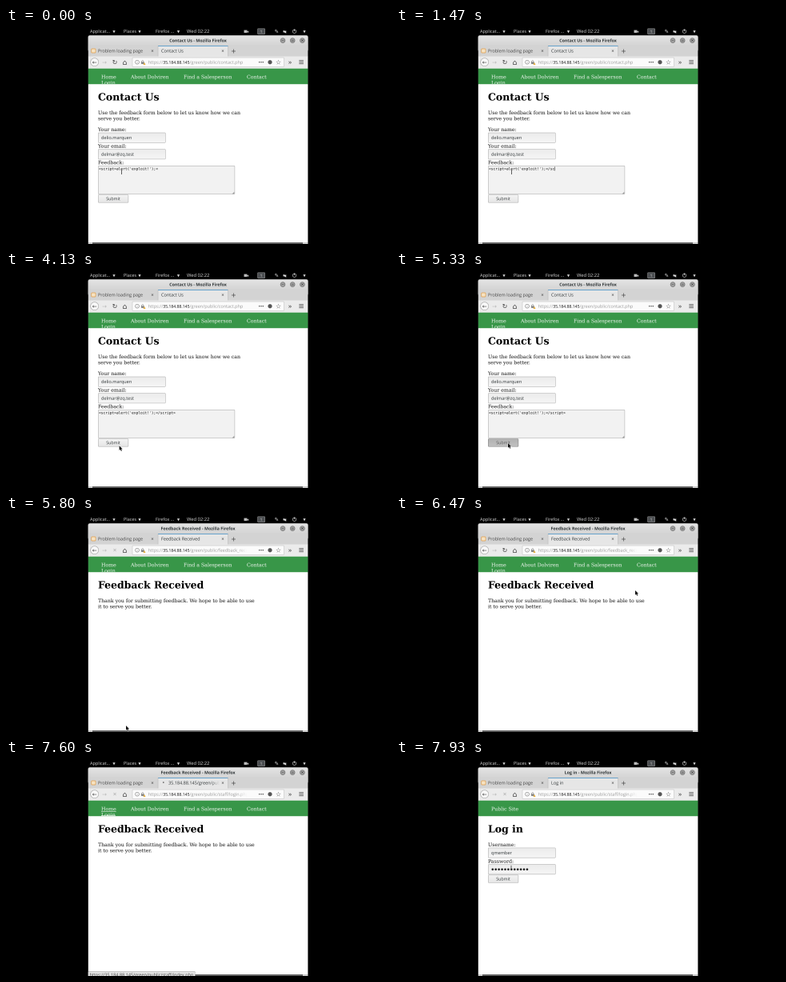
Recreate the animation shown at these times as an HTML page with a canvas. Size 480 by 270 pixels, loop 8 s.

```html
<!DOCTYPE html>
<html lang="en">
<head>
<meta charset="utf-8">
<title>Contact form</title>
<style>
html, body { margin: 0; width: 100%; height: 100%; overflow: hidden; background: #000; }
canvas { display: block; width: 480px; height: 270px; }
</style>
</head>
<body>
<canvas id="stage" width="480" height="270"></canvas>
<script>
const LOOP = 8000, W = 480, H = 270, ZOOM = 4;
const view = document.getElementById('stage').getContext('2d');

// Drawn large, then averaged down for soft small text
const sheet = document.createElement('canvas');
sheet.width = W * ZOOM;
sheet.height = H * ZOOM;
const ctx = sheet.getContext('2d');

const SERIF = '"DejaVu Serif", serif';
const SANS = '"Open Sans", "Noto Sans", sans-serif';
const MONO = '"DejaVu Sans Mono", monospace';
const ICON = '"DejaVu Sans", sans-serif';
const INK = '#2e3436', GREY = '#555', PALE = '#9b9b9b', BORDER = '#b4b4b4', GREEN = '#389648';
const LEFT = 102.8, WIDTH = 274.6, INDENT = 115, CHAR = 2.74;

const HOST = '35.184.88.145';
const OPENING = "<script>alert('exploit!');<", CLOSING = '/script>';

// When each letter of CLOSING appears, and when a mistyped one stays
const KEYS = [330, 530, 600, 1670, 1800, 2000, 2200, 2670];
const STRAY = [870, 1470];

// Pointer key points: time, x, y
const PATH = [[3700, 144.5, 180], [4000, 143, 220], [4270, 140, 214], [5400, 140, 214],
  [5800, 150, 262], [6270, 313, 148], [6470, 299, 93], [7130, 129, 66], [7330, 129, 66],
  [7600, 141.5, 85], [7870, 144, 135]];

const within = (t, from, to) => t >= from && t < to;

function text(str, x, y, size, family, color, align = 'left', weight = '') {
  ctx.save();
  ctx.translate(x, y);
  ctx.scale(0.1, 0.1);
  ctx.font = `${weight} ${size * 10}px ${family}`;
  ctx.textRendering = 'geometricPrecision';
  ctx.textAlign = align;
  ctx.fillStyle = color;
  ctx.fillText(str, 0, 0);
  const width = ctx.measureText(str).width / 10;
  ctx.restore();
  return width;
}

const serif = (str, y, x = INDENT, color = '#111') => text(str, x, y, 6.22, SERIF, color);
const label = (str, x, y, color = INK) => text(str, x, y, 5.5, SANS, color);

// A symbol centred on x, y
function icon(ch, x, y, size, color = '#444') {
  text(ch, x, y + size * 0.36, size, ICON, color, 'center');
}

function rect(x, y, w, h, fill) {
  ctx.fillStyle = fill;
  ctx.fillRect(x, y, w, h);
}

function box(x, y, w, h, fill, stroke = BORDER, r = 0.8) {
  ctx.beginPath();
  ctx.roundRect(x, y, w, h, r);
  ctx.fillStyle = fill;
  ctx.fill();
  ctx.strokeStyle = stroke;
  ctx.lineWidth = 0.6;
  ctx.stroke();
}

function dot(x, y, r, fill, stroke) {
  ctx.beginPath();
  ctx.arc(x, y, r, 0, 7);
  ctx.fillStyle = fill;
  ctx.fill();
  if (stroke) {
    ctx.strokeStyle = stroke;
    ctx.lineWidth = 0.6;
    ctx.stroke();
  }
}

function gradient(x0, y0, x1, y1, from, to) {
  const g = ctx.createLinearGradient(x0, y0, x1, y1);
  g.addColorStop(0, from);
  g.addColorStop(1, to);
  return g;
}

const shade = (y, h, top, bottom) => gradient(0, y, 0, y + h, top, bottom);

function clipped(x, y, w, h, drawInside) {
  ctx.save();
  ctx.beginPath();
  ctx.rect(x, y, w, h);
  ctx.clip();
  drawInside();
  ctx.restore();
}

// Covers the end of a cut-off text with its background
function fade(x, y, w, h, grey) {
  const rgb = `${grey}, ${grey}, ${grey}`;
  rect(x, y, w, h, gradient(x, 0, x + w, 0, `rgba(${rgb}, 0)`, `rgb(${rgb})`));
}

function topBar() {
  const c = '#d8d8d8';
  label('Applicat…', 105, 6, c);
  label('Places', 147, 6, c);
  label('Firefox …', 187, 6, c);
  text('Wed 02:22', 226, 6, 5.8, SANS, c);
  for (const x of [135, 167, 215.5, 373]) icon('▾', x, 4.2, 6.5, c);
  rect(297.5, 2.6, 4, 3.4, '#bbb');
  icon('◂', 302, 4.2, 5, '#bbb');
  box(314.5, 0.8, 9.2, 7, '#4c4f52', '#8a8a8a');
  text('1', 319, 6.2, 5, SANS, '#ddd', 'center');
  icon('✎', 338.3, 4.2, 6.5, c);
  rect(346.5, 3.2, 2, 2.2, c);
  icon('◂', 348.5, 4.2, 7, c);
  dot(360.5, 4.2, 2.2, '#000', c);
  rect(360.1, 1.4, 0.8, 2.6, c);
}

function titleBar(title) {
  box(LEFT, 9.4, WIDTH, 20, shade(9.4, 13, '#e4e4e4', '#d4d4d4'), '#c8c8c8', 2);
  text(title + ' - Mozilla Firefox', 240, 17.6, 5.3, SANS, INK, 'center', 'bold');
  ['−', '▫', '✕'].forEach((ch, i) => {
    const x = 346 + i * 12.2;
    dot(x, 15.6, 2.9, '#a0a0a0', '#6e6e6e');
    icon(ch, x, 15.6, 4.2, '#222');
  });
}

function tabs(t, title, waiting) {
  rect(LEFT, 22, WIDTH, 14, '#d3d3d3');
  box(106.8, 26, 5.2, 5, '#f6e3c4', '#e0912f');
  label('Problem loading page', INDENT, 30.4, '#444');
  rect(190, 22, 87.5, 14, '#e6e6e6');
  rect(190, 22, 87.5, 0.9, '#5b9bc8');
  for (const x of [189.8, 277.3]) rect(x, 22.5, 0.5, 13, BORDER);
  if (waiting) {
    const a = t / 160;
    dot(198 + Math.cos(a) * 1.3, 28.5 + Math.sin(a) * 1.3, 0.8, GREY);
    clipped(202, 23, 65, 12, () => {
      label(HOST + '/green/public', 203, 30.4);
      fade(256, 23, 11, 12, 230);
    });
  } else {
    label(title, 194, 30.4);
  }
  for (const x of [183, 271]) icon('✕', x, 28.5, 4.6);
  icon('+', 284.5, 28.5, 8);
}

function toolbar(t, loading) {
  const y = 42.7;
  rect(LEFT, 35.5, WIDTH, 15.5, '#ebebeb');
  dot(110.7, y, 5, '#f8f8f8', '#a5a5a5');
  icon('←', 110.7, y, 7);
  icon('→', 123, y, 7, '#b8b8b8');
  icon(loading ? '✕' : '↻', 136, y, loading ? 6 : 8, loading ? '#aaa' : '#444');
  icon('⌂', 148.5, y, 9);

  box(158, 37, 189.5, 11.4, '#fbfbfb', '#c6c6c6');
  dot(164, y, 2.4, '#fbfbfb', '#888');
  text('i', 164, y + 1.5, 4, SANS, '#777', 'center');
  rect(169, 42, 3.6, 3, '#888');
  dot(170.8, 41.8, 1.1, '#fbfbfb', '#888');
  icon('▲', 173, 44, 4, '#e5b040');

  let path = '/green/public/contact.php';
  if (t >= 7400) path = '/green/public/staff/login.php';
  else if (t >= 5530) path = '/green/public/feedback_received.php';
  clipped(176, 37.5, 125, 10.5, () => {
    let x = 177.5;
    x += label('https://', x, 44.7, PALE);
    x += text(HOST, x, 44.7, 5.1, SANS, '#111');
    label(path, x, 44.7, PALE);
    if (t >= 5530) fade(289, 37.5, 12, 10.5, 251);
  });

  for (const dx of [-2.3, 0, 2.3]) dot(319 + dx, y, 0.75, GREY);
  dot(330, y, 2.6, GREY);
  icon('☆', 340.5, y, 8);
  icon('»', 355, y, 8);
  for (const dy of [-2, 0, 2]) rect(366.3, y - 0.4 + dy, 5.6, 0.8, '#444');
}

function chrome(t, title) {
  const waiting = within(t, 5470, 5600) || within(t, 7270, 7800);
  const loading = within(t, 5470, 6330) || t >= 7270;
  titleBar(title);
  tabs(t, title, waiting);
  toolbar(t, loading);
}

function field(y, value) {
  box(115.3, y, 84, 12.3, shade(y, 12.3, '#ececec', '#f6f6f6'));
  text(value, 119, y + 8.1, 5.6, SANS, INK);
}

function button(y, pressed) {
  const fill = pressed ? shade(y, 9.6, '#b2b2b2', '#c2c2c2') : shade(y, 9.6, '#f4f4f4', '#e6e6e6');
  box(115.3, y, 37.6, 9.6, fill, pressed ? '#888' : BORDER);
  text('Submit', 134, y + 6.7, 5.3, SANS, pressed ? GREY : INK, 'center');
}

function navBar(t, page) {
  const link = (str, x, y = 63.2) => serif(str, y, x, '#f4f8f4');
  rect(LEFT, 50.7, WIDTH, 19.5, GREEN);
  clipped(LEFT, 51, WIDTH, 19, () => {
    if (page === login) {
      link('Public Site', 119);
      return;
    }
    const home = link('Home', 119);
    const last = link('Login', 119, 70.6);
    link('About Dolviren', 156);
    link('Find a Salesperson', 222);
    link('Contact', 301);
    if (t >= 7130) {
      rect(119, 64.2, home, 0.5, '#fff');
      rect(119, 69.4, last, 0.6, '#fff');
    }
  });
}

function feedbackBox(t) {
  box(115.3, 172.3, 170.6, 35.2, '#f2f2f2');
  icon('◢', 284, 205.8, 3.5, PALE);
  const count = KEYS.filter(k => k <= t).length;
  const typed = OPENING + CLOSING.slice(0, count) + (within(t, ...STRAY) ? 'i' : '');
  text(typed, 116, 177.5, CHAR / 0.602, MONO, '#111');
  if (within(t, 330, 2930)) rect(116.2 + typed.length * CHAR, 173.4, 0.5, 5, '#111');
}

const contact = {
  title: 'Contact Us',
  body(t) {
    serif('Use the feedback form below to let us know how we can', 108);
    serif('serve you better.', 115.3);
    serif('Your name:', 129);
    field(131, 'delio.marquen');
    serif('Your email:', 149.7);
    field(151.6, 'delmar@zq.test');
    serif('Feedback:', 170.3);
    feedbackBox(t);
    button(208.6, within(t, 5330, 5470));
  }
};

const thanks = {
  title: 'Feedback Received',
  body() {
    serif('Thank you for submitting feedback. We hope to be able to use', 108);
    serif('it to serve you better.', 115.3);
  }
};

const login = {
  title: 'Log in',
  body() {
    serif('Username:', 108);
    field(109.9, 'qmember');
    serif('Password:', 128.7);
    field(130.5, '');
    for (let i = 0; i < 12; i++) dot(120.8 + i * 3.92, 136.7, 1.35, '#222');
    button(143.8, false);
  }
};

function pointerAt(t) {
  const next = PATH.findIndex(p => p[0] > t);
  if (next === 0) return PATH[0].slice(1);
  if (next < 0) return PATH[PATH.length - 1].slice(1);
  const [t0, x0, y0] = PATH[next - 1], [t1, x1, y1] = PATH[next];
  const k = (t - t0) / (t1 - t0), e = k * k * (3 - 2 * k);
  return [x0 + (x1 - x0) * e, y0 + (y1 - y0) * e];
}

const ARROW = new Path2D('M0 0V5.7L1.3 4.6 2.3 6.7 3.3 6.2 2.3 4.2H4.1Z');

function pointer(t) {
  const [x, y] = pointerAt(t);
  if (t < 3860 || t >= 7400) {
    icon('I', x, y, 8.5, '#444');
    return;
  }
  ctx.save();
  ctx.translate(x, y);
  ctx.strokeStyle = '#fff';
  ctx.lineWidth = 0.7;
  ctx.stroke(ARROW);
  ctx.fillStyle = '#111';
  ctx.fill(ARROW);
  ctx.restore();
}

function windowEdge(t) {
  rect(LEFT, 268, WIDTH, 2, '#c9c9c9');
  rect(108, 268, 263, 2, '#5c5c5c');
  if (within(t, 7200, 7800)) {
    box(LEFT, 264.3, 133.5, 8, '#e2e2e2');
    label('https://' + HOST + '/green/public/staff/index.php', 104.5, 270.4, '#444');
  }
}

function draw(t) {
  const page = t < 5600 ? contact : t < 7800 ? thanks : login;
  ctx.setTransform(ZOOM, 0, 0, ZOOM, 0, 0);
  rect(0, 0, W, H, '#000');
  topBar();
  chrome(t, page.title);
  rect(LEFT, 50.7, WIDTH, H, '#fff');
  navBar(t, page);
  text(page.title, INDENT, 90.5, 12.44, SERIF, '#000', 'left', 'bold');
  page.body(t);
  windowEdge(t);
  pointer(t);
  view.imageSmoothingQuality = 'high';
  view.drawImage(sheet, 0, 0, W, H);
}

let start;
function tick(now) {
  start ??= now;
  draw((now - start) % LOOP);
  requestAnimationFrame(tick);
}
draw(0);
requestAnimationFrame(tick);
</script>
</body>
</html>
```
